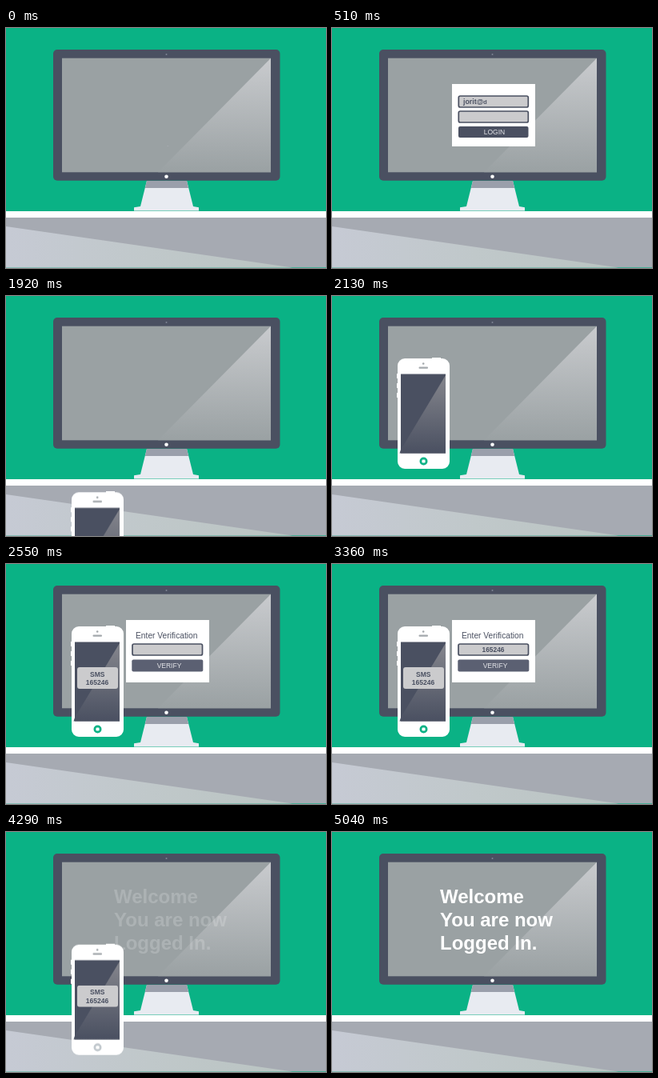
Write an HTML page without scripts that moves like this. It is 400 px wide and 300 px high and loops after 5220 ms.

```html
<!DOCTYPE html>
<html lang="en">
<head>
<meta charset="utf-8">
<title>Two-step login</title>
<style>
  html, body { margin: 0; width: 100%; height: 100%; overflow: hidden; background: #0ab285; }
  svg { display: block; width: 100%; height: 100%; }
  text { font-family: "Liberation Sans", Arial, Helvetica, sans-serif; }

  .dark { fill: #4a5061; }
  .white { fill: #fff; }
  .field { fill: #cbcbcd; stroke: #4a5061; stroke-width: 1.7; }
  .label { fill: #e3e4e8; font-size: 8.5px; text-anchor: middle; }
  .bold { fill: #4a5061; font-weight: bold; }
  .sms { font-size: 8.5px; text-anchor: middle; }

  .login, .verify, .phone, .bubble, .welcome { animation: 5220ms linear infinite both; }
  .login, .verify { transform-origin: 202px 148px; }
  .login { animation-name: login; }
  .verify { animation-name: verify; }
  .phone { animation-name: phone; }
  .bubble { animation-name: bubble; }
  .welcome { animation-name: welcome; }

  /* each character grows from nothing after its own delay */
  .typed tspan {
    animation: type 5220ms linear infinite both;
    animation-delay: calc(var(--start) + var(--i) * var(--step));
  }
  .email { --size: 8.8px; --start: 321ms; --step: 27ms; }
  .pass { --size: 14px; --start: 915ms; --step: 60ms; }
  .code { --size: 8.4px; --start: 2745ms; --step: 105ms; }
  .code tspan { animation-name: type-slow; }

  @keyframes type {
    0% { font-size: 0; }
    .65%, 40% { font-size: var(--size); }
    40.01%, 100% { font-size: 0; }
  }
  @keyframes type-slow {
    0% { font-size: 0; }
    1.72%, 40% { font-size: var(--size); }
    40.01%, 100% { font-size: 0; }
  }
  @keyframes login {
    0% { transform: scale(0); opacity: 1; }
    2.87% { transform: scale(1.055); }
    4.6%, 28.35% { transform: scale(1); }
    30.46% { transform: scale(1.13); opacity: 1; }
    32.18%, 100% { transform: scale(0); opacity: 0; }
  }
  @keyframes verify {
    0%, 46.55% { transform: scale(1); opacity: 0; }
    48.85% { opacity: 1; }
    70.69% { transform: scale(1); }
    72.99% { transform: scale(1.045); opacity: 1; }
    73.56% { transform: scale(1); opacity: .8; }
    74.14% { transform: scale(.93); opacity: .55; }
    77.01%, 100% { transform: scale(.4); opacity: 0; }
  }
  @keyframes phone {
    0% { transform: translateY(224px); }
    34.62% { transform: translateY(224px); animation-timing-function: ease-in-out; }
    40.88% { transform: none; }
    79.89% { transform: none; animation-timing-function: ease-in-out; }
    86.2%, 100% { transform: translateY(224px); }
  }
  @keyframes bubble {
    0%, 42.9% { opacity: 0; }
    44.83%, 100% { opacity: 1; }
  }
  @keyframes welcome {
    0%, 81.03% { opacity: 0; }
    87.36%, 100% { opacity: 1; }
  }
</style>
</head>
<body>
<svg viewBox="0 0 400 300">
  <defs>
    <linearGradient id="glare" x2="0" y2="1">
      <stop stop-color="#c9cbce"/><stop offset="1" stop-color="#9aa1a3"/>
    </linearGradient>
    <linearGradient id="shine" x2="0" y2="1">
      <stop stop-color="#85868d"/><stop offset="1" stop-color="#4a5061"/>
    </linearGradient>
    <linearGradient id="light">
      <stop stop-color="#c6cad4"/><stop offset=".5" stop-color="#c0c8ca"/><stop offset="1" stop-color="#bac4c2"/>
    </linearGradient>
  </defs>

  <!-- desk -->
  <rect class="white" y="229" width="400" height="8"/>
  <rect fill="#a6aab2" y="237" width="400" height="62.4"/>
  <path fill="url(#light)" d="M0 248 358 299.4H0Z"/>

  <!-- monitor -->
  <path fill="#e8ebf1" d="M176 191h50l8 32 7 1.2v4.3h-81v-4.3l8-1.2Z"/>
  <path fill="#9a9fab" d="M176 191h50l2.2 9h-54.4Z"/>
  <rect class="dark" x="59" y="27" width="283.5" height="163.7" rx="5"/>
  <rect fill="#9aa1a3" x="70" y="37.7" width="261" height="142.6"/>
  <path fill="url(#glare)" d="M331 37.7v142.6H190Z"/>
  <circle fill="#7d8494" cx="200.5" cy="33" r="1"/>
  <circle class="white" cx="200.5" cy="185.7" r="2.3"/>

  <g class="login">
    <rect class="white" x="150" y="70" width="104" height="78"/>
    <rect class="field" x="158.3" y="85" width="87" height="14" rx="2"/>
    <rect class="field" x="158.3" y="104" width="87" height="14" rx="2"/>
    <rect class="dark" x="158" y="123" width="87.5" height="14" rx="2"/>
    <text class="label" x="203" y="133">LOGIN</text>
    <text class="bold typed email" x="164" y="95"><tspan style="--i:0">j</tspan><tspan style="--i:1">o</tspan><tspan style="--i:2">r</tspan><tspan style="--i:3">i</tspan><tspan style="--i:4">t</tspan><tspan style="--i:5">@</tspan><tspan style="--i:6">d</tspan><tspan style="--i:7">u</tspan><tspan style="--i:8">l</tspan><tspan style="--i:9">v</tspan><tspan style="--i:10">a</tspan><tspan style="--i:11">.</tspan><tspan style="--i:12">c</tspan><tspan style="--i:13">o</tspan><tspan style="--i:14">m</tspan></text>
    <text class="bold typed pass" x="165.5" y="117"><tspan style="--i:0">•</tspan><tspan style="--i:1">•</tspan><tspan style="--i:2">•</tspan><tspan style="--i:3">•</tspan><tspan style="--i:4">•</tspan></text>
  </g>

  <g class="verify">
    <rect class="white" x="150" y="70" width="104" height="78"/>
    <text x="162" y="93" font-size="10.25" fill="#4a5061">Enter Verification</text>
    <rect class="field" x="158" y="100" width="87.5" height="14" rx="2"/>
    <rect fill="#5b6072" x="157.3" y="119.5" width="89" height="15" rx="2"/>
    <text class="label" x="204" y="130">VERIFY</text>
    <text class="bold typed code" x="187.5" y="110.3"><tspan style="--i:0">1</tspan><tspan style="--i:1">6</tspan><tspan style="--i:2">5</tspan><tspan style="--i:3">2</tspan><tspan style="--i:4">4</tspan><tspan style="--i:5">6</tspan></text>
  </g>

  <g class="welcome white" font-size="24" font-weight="bold">
    <text x="135" y="89">Welcome</text>
    <text x="135" y="118">You are now</text>
    <text x="135" y="147">Logged In.</text>
  </g>

  <g class="phone">
    <path class="white" d="M125 79v-2h11v2ZM83 97h-2v6h2ZM83 109h-2v6h2ZM83 121h-2v6h2Z"/>
    <!-- the home button ring is see-through -->
    <path class="white" fill-rule="evenodd" d="M91 78h47a9 9 0 0 1 9 9v120a9 9 0 0 1-9 9h-47a9 9 0 0 1-9-9v-120a9 9 0 0 1 9-9ZM109.5 206.5a5 5 0 0 0 10 0a5 5 0 0 0-10 0Z"/>
    <rect class="white" x="112.4" y="204.4" width="4.2" height="4.2" rx="1.3"/>
    <circle fill="#a3a8ac" cx="114.2" cy="84.5" r="1.3"/>
    <rect fill="#a3a8ac" x="108.5" y="88.6" width="11.5" height="2.2" rx="1"/>
    <rect class="dark" x="86" y="97.5" width="56" height="99"/>
    <path fill="url(#shine)" d="M142 99v97.5H84.500L86 192Z"/>
    <g class="bubble">
      <rect fill="#cbcbcd" x="89" y="129" width="51" height="27" rx="3"/>
      <text class="bold sms" x="114.2" y="140.500">SMS</text>
      <text class="bold sms" x="114" y="151">165246</text>
    </g>
  </g>
</svg>
</body>
</html>
```
